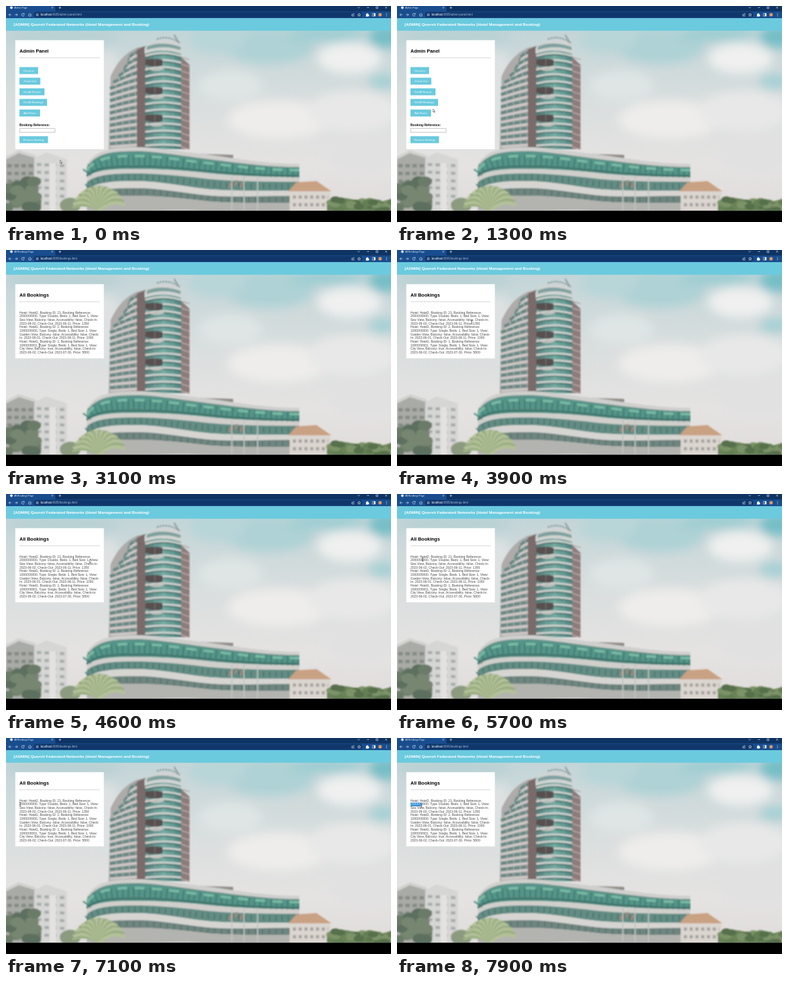
An HTML page that plays this animation: 600x338 px, repeating every 8000 ms.

```html
<!DOCTYPE html>
<html lang="en">
<head>
<meta charset="utf-8">
<title>Admin Page</title>
<style>
html, body { margin: 0; width: 100%; height: 100%; overflow: hidden; background: #000; }
svg { display: block; width: 100vw; height: 100vh; font-family: "Liberation Sans", Arial, sans-serif; }
text { white-space: pre; }
.h { font-weight: bold; font-size: 7.5px; }
.line { font-size: 5px; fill: #484848; }
.btn { font-size: 4.17px; fill: #fff; }
.icon { fill: none; stroke: #e4ecf7; stroke-width: .65; }
</style>
</head>
<body>
<svg viewBox="0 0 600 338" preserveAspectRatio="none">
  <defs>
    <linearGradient id="sky" x2="0" y2="1">
      <stop offset="0" stop-color="#c3d5d8"/>
      <stop offset=".4" stop-color="#d9dede"/>
      <stop offset=".75" stop-color="#e5e3e2"/>
      <stop offset="1" stop-color="#dfdcda"/>
    </linearGradient>
    <linearGradient id="glass">
      <stop offset="0" stop-color="#57807c"/>
      <stop offset=".5" stop-color="#72aaa1"/>
      <stop offset="1" stop-color="#4f8580"/>
    </linearGradient>
    <filter id="soft" x="-20%" y="-20%" width="140%" height="140%"><feGaussianBlur stdDeviation="1.3"/></filter>
    <filter id="haze" x="-50%" y="-50%" width="200%" height="200%"><feGaussianBlur stdDeviation="8"/></filter>
    <clipPath id="view"><rect y="38" width="600" height="282.5"/></clipPath>
  </defs>

  <g clip-path="url(#view)">
    <rect y="38" width="600" height="283" fill="url(#sky)"/>
    <g id="clouds" filter="url(#haze)"></g>
    <g id="scene" filter="url(#soft)"></g>
  </g>
  <rect y="320.5" width="600" height="17.5"/>

  <rect width="600" height="9" fill="#0f3463"/>
  <path d="M0 9V0H75q2 0 2 2v5q0 2 2 2z" fill="#194d8e"/>
  <rect y="8.5" width="600" height="10.5" fill="#194d8e"/>
  <rect x="43.5" y="9.6" width="512" height="8.3" rx="4.1" fill="#10376b"/>
  <circle cx="8.4" cy="2.6" r="2.1" fill="#dfe9f5"/>
  <text id="tab" x="13" y="3.9" font-size="3.7" fill="#f2f6fb"></text>
  <text x="53.8" y="15.3" font-size="4.45" fill="#fff">localhost<tspan id="url" fill="#a3b6d2"></tspan></text>
  <path class="icon" d="M71 1.3l2.4 2.4m0-2.4l-2.4 2.4M84 .7v4m-2-2h4
    M548 1.6l1.7 1.7 1.7-1.7M562.5 2.5h3.4M576.8 1.2h2.8v2.8h-2.8zM591 1.1l2.8 2.8m0-2.8l-2.8 2.8
    M8.6 13.7H4.4m2-2l-2 2 2 2M13.8 13.7H18m-2-2l2 2-2 2
    M28.2 12.6a2.1 2.1 0 1 0 .2 1.8M28.4 11.2v1.7h-1.7
    M34.8 13.6l2.4-2.1 2.4 2.1M35.6 13v2.8h3.2V13
    M540.2 12.8h-1.2v2.8h3.6v-1M540.4 14.2q.2-1.8 2.2-1.8m-1-1l1 1-1 1
    M550.3 11.4l.7 1.6 1.7.2-1.3 1.1.4 1.7-1.5-.9-1.5.9.4-1.7-1.3-1.1 1.7-.2z"/>
  <circle class="icon" cx="48.8" cy="13.7" r="1.7"/>
  <path d="M48.5 13.4h.6v1.3h-.6zM48.5 12.6h.6v.5h-.6z" fill="#e4ecf7"/>
  <path d="M561 12.5h1.2q0-1.2.9-1.2t.9 1.2h1.2v1.2q.9 0 .9.9t-.9.9v.9H561z" fill="#fff"/>
  <path d="M571 11.6h4.4v4.2H571z" class="icon"/>
  <path d="M573.4 11.6h2v4.2h-2z" fill="#fff"/>
  <circle cx="583" cy="13.7" r="2.6" fill="#d99a68"/>
  <path d="M593 11.4v.9m0 .9v.9m0 .9v.9" stroke="#fff" stroke-width=".9"/>

  <rect y="19" width="600" height="19.7" fill="#6bcade"/>
  <text x="12" y="31.2" font-size="6.25" font-weight="bold" fill="#fff">[ADMIN] Quorvit Federated Networks (Hotel Management and Booking)</text>

  <g id="admin">
    <rect x="14.5" y="53.5" width="138" height="170.5" fill="#fff"/>
    <text class="h" x="21" y="73">Admin Panel</text>
    <path d="M21 81h125" stroke="#b5b5b5" stroke-width=".6"/>
    <text x="21" y="188.4" font-size="5" font-weight="bold" fill="#111">Booking Reference:</text>
    <rect x="21.2" y="191.8" width="55" height="6" fill="#fff" stroke="#8a8a8a" stroke-width=".5"/>
  </g>
  <g id="list">
    <rect x="14.5" y="53.5" width="138" height="116" fill="#fff"/>
    <text class="h" x="21" y="73">All Bookings</text>
    <path d="M21 81h125" stroke="#b5b5b5" stroke-width=".6"/>
  </g>
  <g id="pick">
    <rect id="mark" x="21" y="100.9" height="5.9" fill="#2384d6"/>
    <text id="picked" class="line" x="21" y="105.44" style="fill:#fff"></text>
  </g>

  <g id="cursor" stroke-linejoin="round">
    <path id="arrow" d="M0 0v4.9l1.1-1 .9 1.9.8-.4-.9-1.8h1.5z" fill="#fff" stroke="#111" stroke-width=".45"/>
    <path id="hand" d="M-.5 .2q.5-.6 1 0v2l2 .5q.6.3.5 1L2.5 6h-2.6L-1.7 3.8q.1-.9 1.2-.1z" fill="#fff" stroke="#111" stroke-width=".45"/>
    <path id="beam" d="M-1-2.8q1 0 1 .6 0-.6 1-.6M0-2.2v4.4M-1 2.8q1 0 1-.6 0 .6 1 .6" fill="none" stroke="#111" stroke-width=".6"/>
  </g>
</svg>

<script>
const NS = 'http://www.w3.org/2000/svg';
const $ = id => document.getElementById(id);

function add(parent, tag, attrs, text) {
  const el = document.createElementNS(NS, tag);
  for (const k in attrs) el.setAttribute(k, attrs[k]);
  if (text) el.textContent = text;
  $(parent).append(el);
}
const shape = (d, fill) => add('scene', 'path', { d, fill });
const line = (d, stroke, width, dash = 'none') =>
  add('scene', 'path', { d, stroke, fill: 'none', 'stroke-width': width, 'stroke-dasharray': dash });
const blob = (parent, cx, cy, rx, ry, fill) => add(parent, 'ellipse', { cx, cy, rx, ry, fill });

let seed = 7;
const rand = () => (seed = seed * 16807 % 2147483647) / 2147483647;

function drawSky() {
  [[410, 62, 70, 28, '#aed2d5'], [330, 52, 45, 22, '#b8d5d8'], [500, 44, 60, 10, '#9accd1'],
   [593, 48, 28, 18, '#76bec6'], [590, 118, 26, 12, '#a5d0d4'], [90, 48, 90, 14, '#b9d1d4'],
   [535, 82, 50, 24, '#eff0ef'], [425, 178, 80, 30, '#eeedeb'], [540, 165, 70, 32, '#e8e8e8'],
   [350, 125, 50, 24, '#dfe5e5'], [560, 235, 60, 30, '#e2e1e2'], [155, 120, 30, 50, '#dde1e1']
  ].forEach(c => blob('clouds', ...c));
}

function drawTower() {
  shape('M163 110Q178 76 205 65L222 62V226H160z', '#aeabaa');
  for (let y = 72; y < 222; y += 10.8) {
    const drop = 2 + (222 - y) * .11, left = Math.max(162, 198 - (y - 66) * .8);
    line(`M${left} ${y + drop}Q188 ${y + drop * .3} 205 ${y}`, '#638883', 4.6, '9 1.4');
    line(`M${left} ${y + drop + 5}Q188 ${y + drop * .3 + 5} 205 ${y + 5}`, '#d3cfcd', 2.6);
  }
  shape('M204 68L219 62V226H204z', '#7a6a69');
  shape('M271 78L286 92V224H271z', '#8d7b79');
  shape('M217 66Q245 56 273 66V224H217z', 'url(#glass)');
  for (let y = 78; y < 224; y += 10.8) {
    const arch = 3 + (222 - y) * .04;
    line(`M217 ${y}q28 ${-arch} 56 0`, '#cdd0cc', 3.2);
    line(`M217 ${y + 3}q28 ${-arch} 56 0`, '#476a67', 1.6);
    line(`M273 ${y + 2}l13 4`, '#b5a5a2', 1.8);
  }
  for (const y of [90, 134, 177]) {
    shape(`M217 ${y - 6}q14-3 27 0v9q-14 5-27-2z`, '#584f50');
    shape(`M218 ${y + 5}q14 7 28 0v4q-14 6-28-2z`, '#c6c2bf');
  }
  for (const x of [232, 246, 260]) line(`M${x} 66V222`, '#9cc5bd77', .9);
  shape('M216 66Q221 54 246 53T275 66V76Q246 64 216 75z', '#d0d4d2');
  shape('M220 63Q244 54 272 64V69Q246 60 219 69z', '#7fa19f');
  line('M235 52q18-7 36 6', '#8c9b9b', 2.4, '3 1.5');
  line('M262 45l7 12', '#8a9697', 2);
}

// Control heights at the left end, the bulge, the dip and the right end.
const edge = (a, b, c, d) => `M126 ${a}C140 ${b} 175 ${b} 205 ${b}S275 ${c - 4} 310 ${c} 400 ${d} 457 ${d}`;
const slab = (top, bottom, fill) => {
  const [a, b, c, d] = bottom;
  shape(`${edge(...top)}V${d}C400 ${d} 345 ${c + 4} 310 ${c}S235 ${b} 205 ${b} 140 ${b} 126 ${a}z`, fill);
};

function drawPodium() {
  shape('M286 231L354 233V245H286z', '#8f8a87');
  const levels = [[249, 221, 232, 247], [254, 228, 240, 253], [268, 255, 261, 268], [276, 262, 270, 275],
    [289, 274, 286, 289], [297, 285, 296, 297], [310, 297, 305, 308], [321, 321, 321, 321]];
  const fills = ['#cfd0cd', '#559488', '#d0cfcc', '#648d84', '#d6d5d2', '#708580', '#b3b3af'];
  fills.forEach((fill, i) => slab(levels[i], levels[i + 1], fill));
  const between = (i, k) => edge(...levels[i].map((y, j) => y + (levels[i + 1][j] - y) * k));
  line(between(1, .5), '#3d746b', 16, '1.6 7');
  line(between(1, .25), '#78b9a4', 4, '16 11');
  line(between(1, .85), '#43756d', 3);
  line(between(3, .5), '#456f68', 9, '1.6 8');
  line(between(5, .5), '#55706a', 8, '1.6 9');
  line(between(0, .95), '#6e8f88', 1.4);
  for (const x of [352, 371, 392]) line(`M${x} 266V320`, '#c2c6c3', 1.8);
  for (const [x, y] of [[351, 280], [360, 276], [368, 280]]) line(`M${x} ${y - 4}l-3 9`, '#bb8373', 2.2);
}

function drawGround() {
  shape('M0 236L20 226 46 234V321H0z', '#a9aba6');
  line('M0 238L20 228 46 236', '#d2d2cf', 4);
  for (let y = 250; y < 285; y += 12) line(`M2 ${y}H44`, '#848a85', 5, '7 4');
  shape('M44 238L62 229 95 240V321H44z', '#d6d6d4');
  for (let y = 248; y < 318; y += 12) line(`M48 ${y}L93 ${y + 2}`, '#a6acab', 4.5, '7 5');
  shape('M68 246h10v75H68z', '#e3e2e0');
  for (let i = 0; i < 26; i++)
    blob('scene', rand() * 48, 272 + rand() * 48, 11, 8, ['#6b7b68', '#778671', '#5d6f5e'][i % 3]);
  blob('scene', 100, 312, 16, 12, '#8c9b80');
  for (let i = 0; i < 20; i++) {
    const a = Math.PI * (1.05 + i / 22), x = 145 + Math.cos(a) * 42, y = 315 + Math.sin(a) * 36;
    line(`M145 320Q${(145 + x) / 2} ${y - 4} ${x} ${y + 6}`, i % 2 ? '#b3c198' : '#9bae83', 5);
  }
  shape('M442 289L456 277 484 276 506 291V321H442z', '#dcd6d0');
  shape('M440 290L452 276 484 274 507 290z', '#c9a183');
  line('M447 299h55', '#a5a3a0', 5, '5 4');
  line('M447 311h55', '#a5a3a0', 5, '5 4');
  shape('M500 321V306Q520 296 545 304T600 302V321z', '#6a8359');
  for (let i = 0; i < 30; i++)
    blob('scene', 506 + rand() * 96, 303 + rand() * 18, 8, 5, ['#657f54', '#7c9367', '#566f4c'][i % 3]);
}

function drawPanels() {
  [['Check In', 95.6, 29], ['Check Out', 112.2, 32.5], ['Get All Rooms', 128.8, 39],
   ['Get All Bookings', 145.4, 43], ['Add Room', 162, 32], ['Retrieve Booking', 203.7, 44.4]
  ].forEach(([label, y, width]) => {
    add('admin', 'rect', { x: 21, y, width, height: 10.9, fill: '#6bcade' });
    add('admin', 'text', { x: 21 + width / 2, y: y + 6.9, class: 'btn', 'text-anchor': 'middle' }, label);
  });
  [ 'Hotel: Hotel2, Booking ID: 21, Booking Reference:',
    '2000000000, Type: Double, Beds: 1, Bed Size: 1, View:',
    'Sea View, Balcony: false, Accessibility: false, Check-In:',
    '2023-06-02, Check-Out: 2023-06-11, Price: 1350',
    'Hotel: Hotel1, Booking ID: 2, Booking Reference:',
    '1000000000, Type: Single, Beds: 1, Bed Size: 1, View:',
    'Garden View, Balcony: false, Accessibility: false, Check-',
    'In: 2023-06-01, Check-Out: 2023-06-11, Price: 1000',
    'Hotel: Hotel1, Booking ID: 1, Booking Reference:',
    '1000000001, Type: Single, Beds: 1, Bed Size: 1, View:',
    'City View, Balcony: true, Accessibility: false, Check-In:',
    '2023-06-02, Check-Out: 2023-07-30, Price: 5800'
  ].forEach((s, i) => add('list', 'text', { x: 21, y: 99.8 + i * 5.64, class: 'line' }, s));
}

drawSky();
drawTower();
drawPodium();
drawGround();
drawPanels();

const LOOP = 8000, NAVIGATE = 2200, RENDER = 2400, SELECT = 7200;
const DIGIT = 2.78;
// time, x, y
const path = [[0, 84.3, 241], [600, 84.3, 241], [1500, 52, 149.5], [3100, 52, 149.5], [4200, 131, 105],
  [4700, 131, 105], [5600, 40, 102.5], [5900, 40, 102.5], [6800, 22, 103.5], [SELECT, 22, 103.5],
  [7900, 38.3, 105.5], [LOOP, 38.3, 105.5]];

function pointer(t) {
  const i = path.findIndex(p => p[0] > t);
  const [t0, x0, y0] = path[i - 1], [t1, x1, y1] = path[i];
  const k = (t - t0) / (t1 - t0), e = k * k * (3 - 2 * k);
  return [x0 + (x1 - x0) * e, y0 + (y1 - y0) * e];
}
const show = (id, on) => $(id).style.display = on ? '' : 'none';

function frame(now) {
  const t = Math.floor(now % LOOP / 100) * 100;
  const [x, y] = pointer(t);
  const moved = t >= NAVIGATE, listed = t >= RENDER;
  $('tab').textContent = moved ? 'All Bookings Page' : 'Admin Page';
  $('url').textContent = ':8085/' + (moved ? 'bookings.html' : 'admin-panel.html');
  show('admin', !listed);
  show('list', listed);

  const overButton = !listed && y < 156.3 && y > 145.4;
  show('arrow', !listed && !overButton);
  show('hand', overButton);
  show('beam', listed);
  $('cursor').setAttribute('transform', `translate(${x} ${y})`);

  const count = t > SELECT ? Math.max(0, Math.round((x - 21) / DIGIT)) : 0;
  show('pick', count > 0);
  $('mark').setAttribute('width', count * DIGIT);
  $('picked').textContent = '2000000000'.slice(0, count);
  requestAnimationFrame(frame);
}
frame(performance.now());
</script>
</body>
</html>
```
